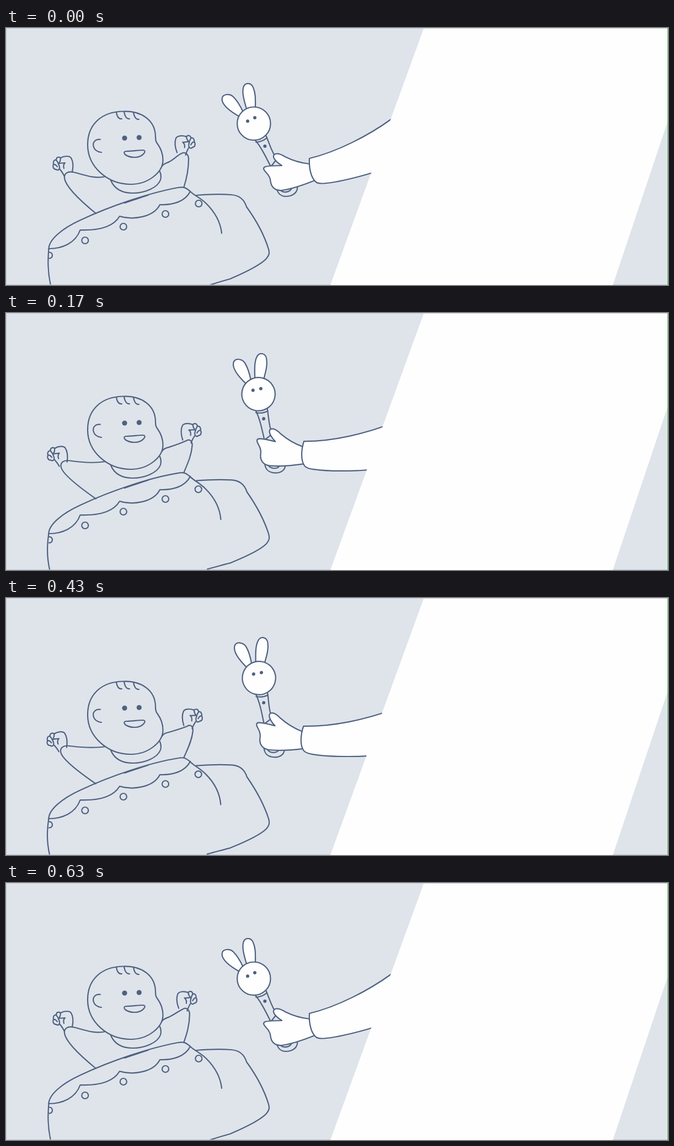
Animation, 1200 px wide and 467 px high, one loop 0.66 s. Source, as an HTML page with a canvas:

```html
<!DOCTYPE html>
<html lang="en">
<head>
<meta charset="utf-8">
<title>Baby and rattle</title>
<style>
  html, body { margin: 0; width: 100%; height: 100%; overflow: hidden; background: #dfe4eb; }
  canvas { display: block; width: 100vw; height: 100vh; }
</style>
</head>
<body>
<canvas id="stage" width="1200" height="467"></canvas>
<script>
const ctx = document.getElementById('stage').getContext('2d');
const BG = '#dfe4eb', INK = '#4e6180', WHITE = '#fefefe', EDGE = '#bfc7d3';
const LOOP = 660, STEP = 100 / 3, STEPS = 20, PEAK = 9;

const NUM = /-?\d+(\.\d+)?/g;

// Blend two path strings that share the same commands.
function morph(a, b, p) {
  const to = b.match(NUM);
  let i = 0;
  return a.replace(NUM, n => (+n + (to[i++] - n) * p).toFixed(2));
}

function draw(d, fill) {
  const path = new Path2D(d);
  if (fill) { ctx.fillStyle = fill; ctx.fill(path); }
  ctx.stroke(path);
}

function ring(x, y, r, fill) {
  ctx.beginPath();
  ctx.arc(x, y, r, 0, Math.PI * 2);
  if (fill) { ctx.fillStyle = fill; ctx.fill(); }
  ctx.stroke();
}

function dot(x, y, r) {
  ctx.beginPath();
  ctx.arc(x, y, r, 0, Math.PI * 2);
  ctx.fillStyle = INK;
  ctx.fill();
}

function poly(color, ...pts) {
  ctx.beginPath();
  pts.forEach(([x, y]) => ctx.lineTo(x, y));
  ctx.fillStyle = color;
  ctx.fill();
}

// Run fn with the point (x, y) moved to (toX, toY), turned by deg, optionally mirrored.
function posed(x, y, toX, toY, deg, fn, flip = 1) {
  ctx.save();
  ctx.translate(toX, toY);
  ctx.rotate(deg * Math.PI / 180);
  ctx.scale(flip, 1);
  ctx.translate(-x, -y);
  fn();
  ctx.restore();
}

function fist() {
  draw('M105.5 269C104 265 101 261 98 257');
  draw('M96 249C99 256 95 260 91 257C86 257 84 252 86 248C85 243 87 239 91 240C91 235 95 233 99 236C106 232 115 232 118 236C122 243 122 253 120 262');
  draw('M86 248C89 247 91 249 93 252');
  draw('M91 240C93 242 95 246 96 249');
  draw('M99 236C99 240 98 243 96 246C99 245 103 246 107 245C104 248 104 252 105 255');
}

function baby(p, q) {
  draw(morph(
    'M180 270C160 275 140 266 122 262C112 260 105 264 106 273C108 285 125 306 163 337',
    'M180 270C160 272 128 274 110 272C101 271 94 276 96 284C98 292 112 305 163 338', p));
  draw(morph(
    'M283 251C286 246 291 246 296 243C304 239 311 231 318 228C324 224 331 229 331 238C331 260 327 275 322.5 289',
    'M283 251C286 245 291 245 296 244C308 241 323 239 333 234.5C339 231 343 236 341.5 244C339 260 329 276 322.5 290', q));
  posed(104, 250, 104 - 16 * p, 250 + 15.5 * p, -5 * p, fist);
  posed(104, 250, 324 + 18 * q, 212 + 8.5 * q, 5 * q - 9, fist, -1);

  draw('M190 277C196 291 208 300 230 300C252 300 275 290 280 276C281.5 271 281 266 279 261');
  draw('M213 151.5C246 150.5 271 168 271 198C271 205 272 207 275 211C280 218 284.5 228 284.5 240C284.5 262 258 284 226 284C185 284 148 253 148 212C148 176 172 152 213 151.5Z', BG);
  draw('M171 202.5C160 202 157 209 158.5 215C160 221 165 225 173 226');
  [[200, 153, 0], [214, 152, 1], [231, 153, 1]].forEach(([x, y, s]) =>
    draw(`M${x} ${y}C${x + 1} ${y + 7} ${x + 4} ${y + 13 + s} ${x + 10} ${y + 12 + s}`));
  dot(215, 200, 4.6);
  dot(241.3, 199, 4.6);
  draw('M218 224C230 224 238 222 248 222C252 222 253 225 250 228C246 233 240 235 233 235C226 235 220 233 216 230C213 227 214 224 218 224Z');
}

function blanket(p) {
  draw(morph(
    'M77.5 401C78 385 100 365 135 349C190 323 262 299 312 290C322 288 326 290 334 297',
    'M77.5 400C78 385 100 365 135 349C190 323 262 299 312 291.5C322 289.5 326 291 334 298', p));
  draw('M215 318C228 313 243 309 258 303.5');
  draw('M77.5 401C102 401 126 391 134.5 367C162 368 193 364 206 342C228 349 267 345 279 321C303 322 325 315 334 297');
  draw(morph(
    'M334 297C342 305 352 308 363 319C381 337 389 354 391 373',
    'M334 298C342 306 352 310 362 321C379 338 387 357 388.5 376.5', p));
  draw(morph(
    'M345 304C370 302 395 302 408 303C424 304 432 312 436 325C454 350 469 379 476 402C478 409 477 413 472 419C460 432 420 450 406 456C395 459 385 462 369 467',
    'M345 305C370 303 395 303 408 303.5C424 304 433 312 437 325C454 350 469 379 476.5 402C478 409 477.5 413 472.5 419C460 432 420 448 406 453.5C395 456 378 461 362.5 464.5', p));
  draw(morph('M77.5 401C76 420 75 440 81 468', 'M77.5 400C74 420 72 440 78.5 468', p));
  draw(morph('M78 407.5C86 407 86 419 78 418.5', 'M78 406C86 405.5 86 417.5 78 417', p));
  ring(143.3, 386, 6);
  ring(212.8, 361, 6);
  ring(289, 338, 6);
  ring(349.3 - p, 319 + 2 * p, 6);
}

function rattle() {
  draw('M491 293C494 304 503 308 515 305C525 302 529 295 528 288L510 284Z', BG);
  draw('M499 296C505 300 515 298 518 291');
  draw('M451 203C461 214 470 232 480 252L491 238C481 225 477 208 471 195Z', BG);
  draw('M453 207.5C461 207 468 204 473 199.5');
  dot(469.3, 214.8, 3);
  draw('M425 162C405 151 391.5 139 391.5 129C392 119 406 119 412 125C420 133 425 142 430 153', WHITE);
  draw('M436 147C431 130 428 118 430 109C432 98.5 444 98 448 108C453 119 452 132 452 146', WHITE);
  ring(449.3, 173.7, 30.2, WHITE);
  dot(438, 169.3, 3);
  dot(451, 163, 3);
}

function arm() {
  draw('M550 247C532 245 518 240 506 234C498 229 490 227 486 230C483 234 486 241 500 250C488 250 478 250 470 252C465 254 467 258 471 262C479 270 479 275 480 281C482 291 490 296 500 295C515 293 535 287 562 276', WHITE);
  draw('M740 133L697 166.5C657 195.5 600 225 550 237C549 252 552 272 562 280C566 283 572 283 580 282C610 279 640 270 661 264L682 257L720 244', WHITE);
}

function render(now) {
  const t = Math.floor((now % LOOP) / 10) * 10;
  const k = Math.min(STEPS - 1, Math.floor((t + 5) / STEP));
  const p = k < PEAK ? k / 8 : (STEPS - 1 - k) * 0.1125;
  const q = k < PEAK ? k * 0.1225 : 1.1 - (k - PEAK) * 0.0925;

  ctx.fillStyle = BG;
  ctx.fillRect(0, 0, 1200, 467);
  ctx.strokeStyle = INK;
  ctx.lineWidth = 2.2;
  ctx.lineJoin = ctx.lineCap = 'round';

  baby(p, q);
  blanket(p);
  posed(560.5, 194.5, 560.5, 194.5, 22.4 * p, () => { rattle(); arm(); });

  ctx.fillStyle = EDGE;
  ctx.fillRect(0, 466, 1200, 1);
  ctx.fillRect(0, 0, 1, 467);
  poly(WHITE, [757.5, 0], [1200, 0], [1200, 168], [1100, 467], [588, 467]);
  ctx.fillStyle = EDGE;
  ctx.fillRect(0, 0, 1200, 1);
  ctx.fillStyle = '#5fb85a';
  ctx.fillRect(1199, 0, 1, 467);
}

const start = performance.now();
function tick() {
  render(performance.now() - start);
  requestAnimationFrame(tick);
}
tick();
</script>
</body>
</html>
```
